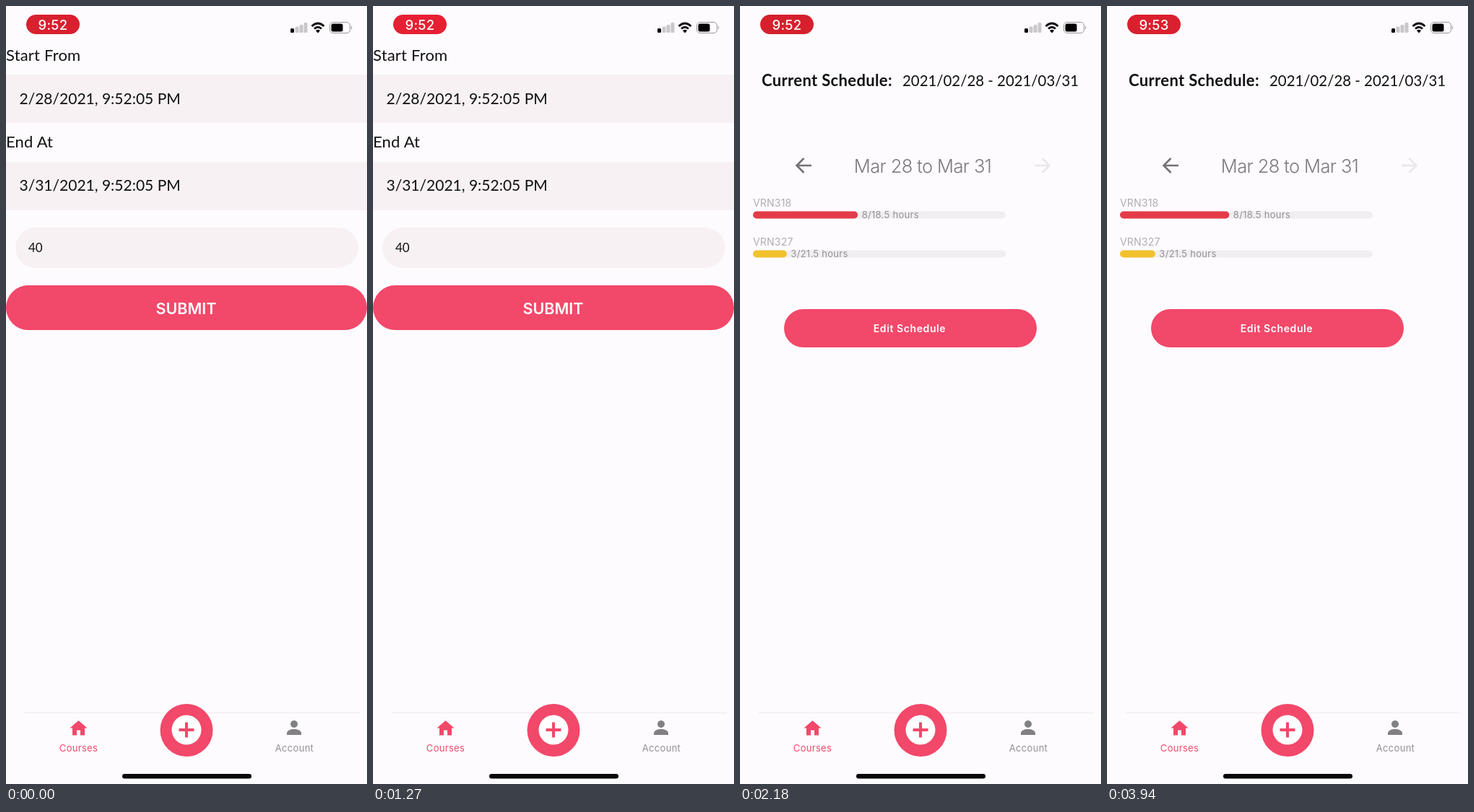
These frames come from a looping animation (500x1078 px, 3970 ms). An HTML page:

```html
<!DOCTYPE html>
<html lang="en">
<head>
<meta charset="utf-8">
<title>Schedule form</title>
<style>
  html, body { margin: 0; width: 100%; height: 100%; overflow: hidden; background: #fefbff; }
  svg { display: block; width: 100%; height: 100%; }
  text { font-family: Lato, sans-serif; font-size: 22px; fill: #111; white-space: pre; }
  .ui { font-family: Inter, "Liberation Sans", sans-serif; }
  .head { letter-spacing: .2px; }
  .date { font-size: 21px; }
  .mid { text-anchor: middle; }
  .label { font-size: 14px; fill: #b0adb1; letter-spacing: .2px; }
  .hours { font-size: 13px; fill: #929093; letter-spacing: .3px; }
  .tab { font-size: 13px; letter-spacing: .3px; }
  .pink { fill: #f2486a; }
  .field { fill: #f7f1f3; }
  .arrow { fill: none; stroke: #737174; stroke-width: 2.6; }
</style>
</head>
<body>
<svg viewBox="0 0 500 1078">
  <rect width="500" height="1078" fill="#fefbff"/>

  <g id="form">
    <text class="head" x="0" y="75.5">Start From</text>
    <rect class="field" y="95" width="500" height="67"/>
    <text class="date" x="18.5" y="135.5">2/28/2021, 9:52:05 PM</text>
    <text class="head" x="0" y="196">End At</text>
    <rect class="field" y="216" width="500" height="67"/>
    <text class="date" x="18.5" y="256">3/31/2021, 9:52:05 PM</text>
    <rect class="field" x="13" y="307" width="475" height="56" rx="28"/>
    <text x="31" y="341" style="font-size:17px">40</text>
  </g>

  <g id="submit">
    <rect class="pink" y="387" width="500" height="62" rx="31"/>
    <text class="ui mid" x="249.5" y="426.5" style="font-size:21.5px;font-weight:600;fill:#fff">SUBMIT</text>
  </g>

  <g id="schedule">
    <text x="30" y="111" style="font-weight:bold;letter-spacing:.35px">Current Schedule:</text>
    <text x="225" y="111" style="font-size:20.4px">2021/02/28 - 2021/03/31</text>
    <path class="arrow" d="M99 221H79M88.5 211L78.5 221L88.5 231"/>
    <path class="arrow" d="M408 221H428M418.5 211L428.5 221L418.5 231" style="stroke:#eae7eb"/>
    <text class="ui mid" x="253" y="230.5" style="font-size:25.5px;font-weight:300;fill:#7b797c;letter-spacing:-.62px">Mar 28 to Mar 31</text>
    <g id="bars"></g>
    <rect class="pink" x="61" y="420" width="350" height="53" rx="26.5"/>
    <text class="ui mid" x="235" y="451.5" style="font-size:14px;font-weight:600;fill:#fff;letter-spacing:.6px">Edit Schedule</text>
  </g>

  <rect id="pill" x="28" y="12" width="74" height="27" rx="13.5"/>
  <text id="clock" class="ui mid" x="65" y="32.5" style="font-size:18.5px;font-weight:500;fill:#fff;letter-spacing:.3px"></text>
  <g>
    <rect x="394" y="31" width="5" height="6" rx="1.5"/>
    <g fill="#c9c7ca">
      <rect x="400.5" y="28.5" width="5" height="8.5" rx="1.5"/>
      <rect x="406.5" y="26" width="5" height="11" rx="1.5"/>
      <rect x="412.5" y="23" width="5" height="14" rx="1.5"/>
    </g>
    <g fill="none" stroke="#111" stroke-width="2.8">
      <path d="M423.5 28Q432 20 440.5 28"/>
      <path d="M427 31.5Q432 27 437 31.5"/>
    </g>
    <path d="M429 34Q432 31.5 435 34L432 37.5Z"/>
    <rect x="448.5" y="22.5" width="28" height="15" rx="4.5" fill="none" stroke="#99979a"/>
    <rect x="450.5" y="24.5" width="16" height="11" rx="2.5"/>
    <path d="M478 27.5Q480.5 30 478 32.5Z" fill="#99979a"/>
  </g>

  <path d="M26 979.5H490" stroke="#ece9ed"/>
  <path class="pink" d="M100.5 990L88.5 1000.5H92V1010.5H98V1003.5H103V1010.5H109V1000.5H112.5Z"/>
  <text class="ui mid tab pink" x="100.5" y="1033">Courses</text>
  <circle class="pink" cx="250" cy="1003.5" r="36.5"/>
  <circle cx="250" cy="1003" r="20.5" fill="#fff"/>
  <path d="M239.5 1003H260.5M250 992.5V1013.5" stroke="#f2486a" stroke-width="4"/>
  <g fill="#818083">
    <circle cx="399" cy="995" r="5"/>
    <path d="M389 1010V1007.5C389 1000 409 1000 409 1007.5V1010Z"/>
  </g>
  <text class="ui mid tab" x="399.5" y="1033" style="fill:#929094">Account</text>
  <rect x="161" y="1064" width="179" height="6.5" rx="3.25" fill="#080808"/>
</svg>

<script>
  const LOOP = 3970;
  const SCHEDULE_AT = 1742, FORM_GONE_AT = 2060, MINUTE_AT = 2500;
  const TRACK = 350;
  const courses = [
    { name: 'VRN318', done: 8, total: 18.5, color: '#e43b49', y: 289.5 },
    { name: 'VRN327', done: 3, total: 21.5, color: '#f2c12e', y: 343.5 }
  ];
  const el = id => document.getElementById(id);
  const show = (id, on) => el(id).setAttribute('display', on ? 'inline' : 'none');

  // Eased progress from 0 to 1
  function ease(t, start, duration) {
    const p = Math.min(1, Math.max(0, (t - start) / duration));
    return p * p * (3 - 2 * p);
  }

  el('bars').innerHTML = courses.map(c => `
    <text class="ui label" x="18" y="${c.y - 11.5}">${c.name}</text>
    <rect x="18" y="${c.y - 5}" width="${TRACK}" height="10" rx="5" fill="#f0eef0"/>
    <rect class="fill" x="18" y="${c.y - 5}" height="10" rx="5" fill="${c.color}"/>
    <text class="ui hours" y="${c.y + 4}">${c.done}/${c.total} hours</text>`).join('');
  const fills = document.querySelectorAll('.fill');
  const hours = document.querySelectorAll('.hours');

  function draw(t) {
    const formVisible = t < FORM_GONE_AT;
    show('form', formVisible);
    show('submit', t < SCHEDULE_AT);
    show('schedule', t >= SCHEDULE_AT);
    el('schedule').setAttribute('transform', `translate(0 ${formVisible ? 311 : 0})`);
    el('submit').setAttribute('opacity', 1 - 0.8 * (ease(t, 440, 150) - ease(t, 920, 250)));

    const progress = ease(t, SCHEDULE_AT, 500);
    courses.forEach((c, i) => {
      const width = TRACK * c.done / c.total * progress;
      fills[i].setAttribute('width', width);
      hours[i].setAttribute('x', 23.5 + width);
    });

    const glow = Math.cos((t - 1270) / 2000 * 2 * Math.PI);
    el('pill').setAttribute('fill', `rgb(${222 + 8 * glow}, 32, ${48 + 3 * glow})`);
    el('clock').textContent = t < MINUTE_AT ? '9:52' : '9:53';
  }

  const begin = performance.now();
  function tick() {
    draw((performance.now() - begin) % LOOP);
    requestAnimationFrame(tick);
  }
  tick();
</script>
</body>
</html>
```
